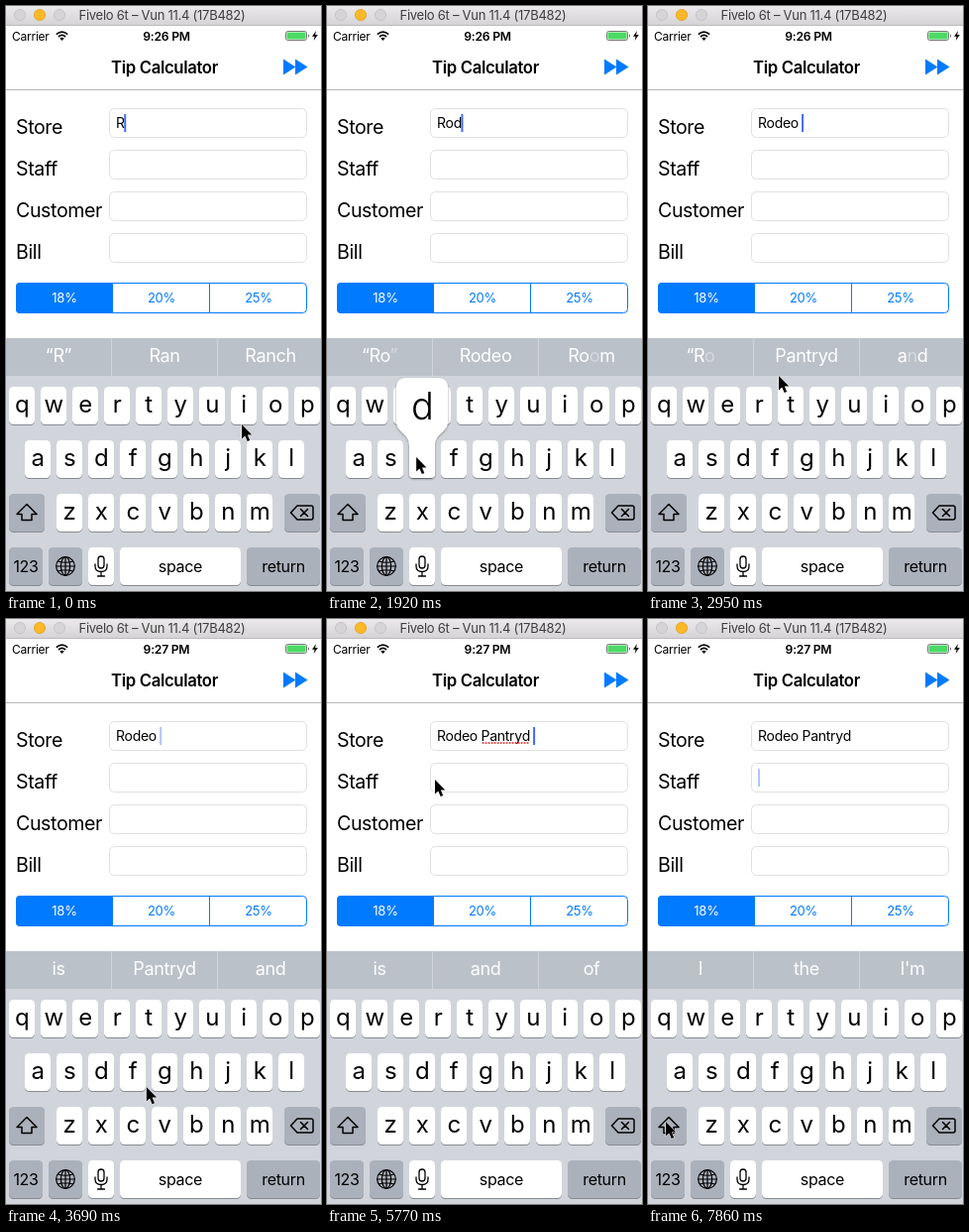
An HTML page for the animation above (8 s loop, 318x590 px).

```html
<!DOCTYPE html>
<html lang="en">
<head>
<meta charset="utf-8">
<title>Tip Calculator</title>
<style>
  html, body { margin: 0; width: 100%; height: 100%; overflow: hidden; background: #fff; }
  svg { display: block; width: 100%; height: 100%; }
  text { font-family: Inter, Roboto, "Liberation Sans", sans-serif; letter-spacing: -.02em; white-space: pre; }
  .mid { text-anchor: middle; }
  .hint { font-size: 18px; fill: #fff; text-anchor: middle; }
  .icon { fill: none; stroke: #000; stroke-width: 1.5; stroke-linejoin: round; stroke-linecap: round; }
</style>
</head>
<body>
<svg id="stage" viewBox="0 0 318 590">
  <defs>
    <linearGradient id="bar" x2="0" y2="1">
      <stop offset="0" stop-color="#ebe9eb"/><stop offset="1" stop-color="#d4d2d4"/>
    </linearGradient>
    <filter id="soft" x="-20%" y="-20%" width="140%" height="140%">
      <feDropShadow dx="0" dy="1" stdDeviation="1.3" flood-opacity=".4"/>
    </filter>
  </defs>
  <rect width="318" height="590" fill="#fff"/>
  <rect width="318" height="20" fill="url(#bar)"/>
  <path d="M0 19.5H318" stroke="#bcbabc"/>
  <g fill="#d6d4d6" stroke="#c3c1c3" stroke-width=".8">
    <circle cx="14" cy="9" r="5.6"/>
    <circle cx="34" cy="9" r="5.6" fill="#fcb827" stroke="#e0a023"/>
    <circle cx="54" cy="9" r="5.6"/>
  </g>
  <text x="157.5" y="14" class="mid" font-size="13" fill="#3e3e3e">Fivelo 6t – Vun 11.4 (17B482)</text>

  <text x="6" y="34.5" font-size="12">Carrier</text>
  <g fill="none" stroke="#000" stroke-width="1.7">
    <path d="M50.8 28.6Q56.5 23.6 62.2 28.6M53 31Q56.5 27.8 60 31"/>
    <path d="M56.5 35l-2.2-2.5q2.2-1.6 4.4 0z" fill="#000" stroke="none"/>
  </g>
  <text id="clock" x="162" y="34.5" class="mid" font-size="12.2" font-weight="600"></text>
  <rect x="282.5" y="25.5" width="21" height="9" rx="2" fill="#fff" stroke="#555" stroke-width=".8"/>
  <rect x="283.5" y="26.5" width="19" height="7" rx="1" fill="#4cd964"/>
  <path d="M305 28.2q2 1.8 0 3.6z" fill="#555"/>
  <path d="M313 25l-4 5.7h2.6l-1 4.3 4.2-6h-2.7z"/>

  <text x="160" y="68" class="mid" font-size="16.7" font-weight="600">Tip Calculator</text>
  <path d="M280 53.5l12 7.8v-7.8l12.5 8-12.5 8v-7.8l-12 7.8z" fill="#007aff"/>
  <path d="M0 84.5H318" stroke="#b6b6b8"/>

  <g id="form"></g>
  <text id="entry" x="111" y="122.5" font-size="14"></text>
  <path id="squiggle" stroke="#d9473f" stroke-width="2.2" stroke-linecap="round" stroke-dasharray="0 3"/>
  <rect id="caret" width="2" height="18" fill="#426bf2"/>

  <rect x="10" y="279" width="98" height="31" rx="4" fill="#007aff"/>
  <rect x="10.5" y="279.5" width="293" height="30" rx="4" fill="none" stroke="#007aff"/>
  <path d="M107.5 279.5v30M205.5 279.5v30" stroke="#007aff"/>
  <g class="mid" font-size="13" fill="#007aff">
    <text x="59" y="299" fill="#fff">18%</text>
    <text x="157" y="299">20%</text>
    <text x="255" y="299">25%</text>
  </g>

  <rect y="335" width="318" height="255" fill="#d1d5db"/>
  <rect y="335" width="318" height="38" fill="#bac1c9"/>
  <path d="M106.5 335v38M213.5 335v38" stroke="#cfd4da"/>
  <text id="ghost" x="160" y="359" class="hint" opacity=".25"></text>
  <g id="hints"></g>
  <g id="keys"></g>

  <g class="icon">
    <path d="M21 502.5l10 10h-5v6h-10v-6h-5z"/>
    <path d="M287.5 511l6.5-7h14q2 0 2 2v10q0 2-2 2h-14zM297.5 507.5l7 7m0-7l-7 7"/>
    <g stroke-width="1.2">
      <circle cx="60" cy="565" r="9.3"/>
      <ellipse cx="60" cy="565" rx="4.6" ry="9.3"/>
      <path d="M60 555.7v18.6M50.7 565h18.6M52.5 560q7.500 2.500 15 0M52.500 570q7.500-2.500 15 0"/>
    </g>
    <rect x="93" y="555" width="6" height="12" rx="3" stroke-width="1.3"/>
    <path d="M90 563v2q0 5.500 6 5.500t6-5.500v-2M96 570.500v4.500M92.500 575h7" stroke-width="1.3"/>
  </g>

  <g id="popup" filter="url(#soft)">
    <path d="M-16-63h32q10 0 10 10v34c0 11-13 12-13 24v29q0 4-4 4h-18q-4 0-4-4v-29c0-12-13-13-13-24v-34q0-10 10-10z" fill="#fff"/>
    <text id="big" y="-21" class="mid" font-size="38" font-weight="300"></text>
  </g>
  <path id="arrow" d="M0 0v14.400l3.300-3 2.400 5.700 2.500-1-2.400-5.600h4.500z" stroke="#fff" stroke-width="1" paint-order="stroke"/>
</svg>
<script>
const $ = id => document.getElementById(id);
const LOOP = 8000, STEP = LOOP / 54;

function add(parent, name, attrs, text = "") {
  const el = document.createElementNS("http://www.w3.org/2000/svg", name);
  for (const key in attrs) el.setAttribute(key, attrs[key]);
  el.textContent = text;
  return parent.appendChild(el);
}

["Store", "Staff", "Customer", "Bill"].forEach((label, i) => {
  const y = 103.5 + 42 * i;
  add($("form"), "text", { x: 10, y: y + 25.5, "font-size": 19.6 }, label);
  add($("form"), "rect", { x: 104.5, y, width: 199, height: 29, rx: 5, fill: "#fff", stroke: "#e0e0e0" });
});

function key(x, y, w, label = "", dark = false, size = 24) {
  const box = { x, width: w, height: 38, rx: 4.5 };
  add($("keys"), "rect", { ...box, y: y + 1, fill: "#888b90" });
  add($("keys"), "rect", { ...box, y, fill: dark ? "#abb1bb" : "#fff" });
  add($("keys"), "text", { x: x + w / 2, y: y + (size > 20 ? 26 : 24.5), class: "mid", "font-size": size }, label);
}

const spots = {};
[["qwertyuiop", 3], ["asdfghjkl", 19], ["zxcvbnm", 51]].forEach(([row, left], r) =>
  [...row].forEach((ch, i) => {
    const x = left + 32 * i, y = 384 + 54 * r;
    spots[ch] = [x + 13, y];
    key(x, y, 26, ch);
  }));
key(3, 492, 36, "", true);
key(281, 492, 36, "", true);
key(3, 546, 34, "123", true, 16);
key(43, 546, 34, "", true);
key(83, 546, 26);
key(115, 546, 122, "space", false, 16);
key(243, 546, 74, "return", true, 16);

const hints = [53, 160, 267].map(x => add($("hints"), "text", { x, y: 359, class: "hint" }));

// Each row starts at a step; "~" makes the next letter faint.
const hintRows = [
  [0, "“R”", "Ran", "Ranch"],
  [8, "“Ro”", "Rod~e", "Roo~m"],
  [9, "“Ro”", "Rode", "Room"],
  [13, "“Ro~”", "Rodeo", "Ro~om"],
  [14, "“Rod”", "Rodeo", "Rode"],
  [20, "“R~o", "Pantryd", "a~nd"],
  [21, "is", "Pantryd", "and"],
  [31, "is", "and", "and", "Pantryd"],
  [32, "is", "and", "of"],
  [40, "I", "the", "I'm"]
];
const entryRows = [[-4, "R"], [5, "Ro"], [13, "Rod"], [20, "Rodeo "], [31, "Rodeo Pantryd "], [40, "Rodeo Pantryd"]];
const presses = [[5, 6, "o"], [12, 13, "d"]];
const blink = [1, 1, 1, 1, 1, .4, 0, 0];
const path = [
  [0, 238, 422], [2, 272, 414], [6, 272, 414], [8, 140, 436], [10, 91, 455], [14, 90, 455],
  [18, 133, 373], [20, 132, 373], [23, 140, 511], [24, 140, 511], [27, 147, 361], [35, 146, 360],
  [38, 112, 172], [39, 109, 162], [40, 109, 162], [42, 175, 427], [44, 262, 460], [47, 150, 539],
  [49, 84, 528], [50, 136, 523], [52, 40, 512], [53, 18, 507]
];

const current = (rows, k) => rows.filter(row => row[0] <= k).pop();

function pointer(k) {
  const a = current(path, k), b = path[path.indexOf(a) + 1] || a;
  const u = a === b ? 0 : (k - a[0]) / (b[0] - a[0]);
  const s = u * u * (3 - 2 * u);
  return [1, 2].map(i => a[i] + (b[i] - a[i]) * s);
}

function setHint(el, text) {
  el.textContent = "";
  for (const part of text.match(/~.|[^~]+/g)) {
    const faint = part[0] === "~";
    add(el, "tspan", { "fill-opacity": faint ? .4 : 1 }, faint ? part[1] : part);
  }
}

function width(text) {
  $("entry").textContent = text;
  return $("entry").getComputedTextLength();
}

function draw(k) {
  $("clock").textContent = k < 24 ? "9:26 PM" : "9:27 PM";

  const row = current(hintRows, k);
  hints.forEach((el, i) => setHint(el, row[i + 1]));
  $("ghost").textContent = row[4] || "";

  const [since, text] = current(entryRows, k), staff = k >= 40;
  const from = 113 + width("Rodeo "), to = 111 + width("Rodeo Pantryd");
  $("squiggle").setAttribute("d", k >= 31 && !staff ? `M${from} 125H${to}` : "");
  const end = width(text);
  $("caret").setAttribute("x", staff ? 111 : 110.5 + end);
  $("caret").setAttribute("y", staff ? 151 : 109);
  $("caret").setAttribute("opacity", blink[(k - since) % blink.length]);

  const press = presses.find(([a, b]) => k >= a && k <= b);
  $("popup").style.display = press ? "" : "none";
  if (press) {
    $("popup").setAttribute("transform", `translate(${spots[press[2]]})`);
    $("big").textContent = press[2];
  }
  $("arrow").setAttribute("transform", `translate(${pointer(k)})`);
}

let shown = -1;
function tick() {
  const k = Math.min(53, Math.floor((performance.now() % LOOP + 20) / STEP));
  if (k !== shown) draw(shown = k);
  requestAnimationFrame(tick);
}
tick();
</script>
</body>
</html>
```
